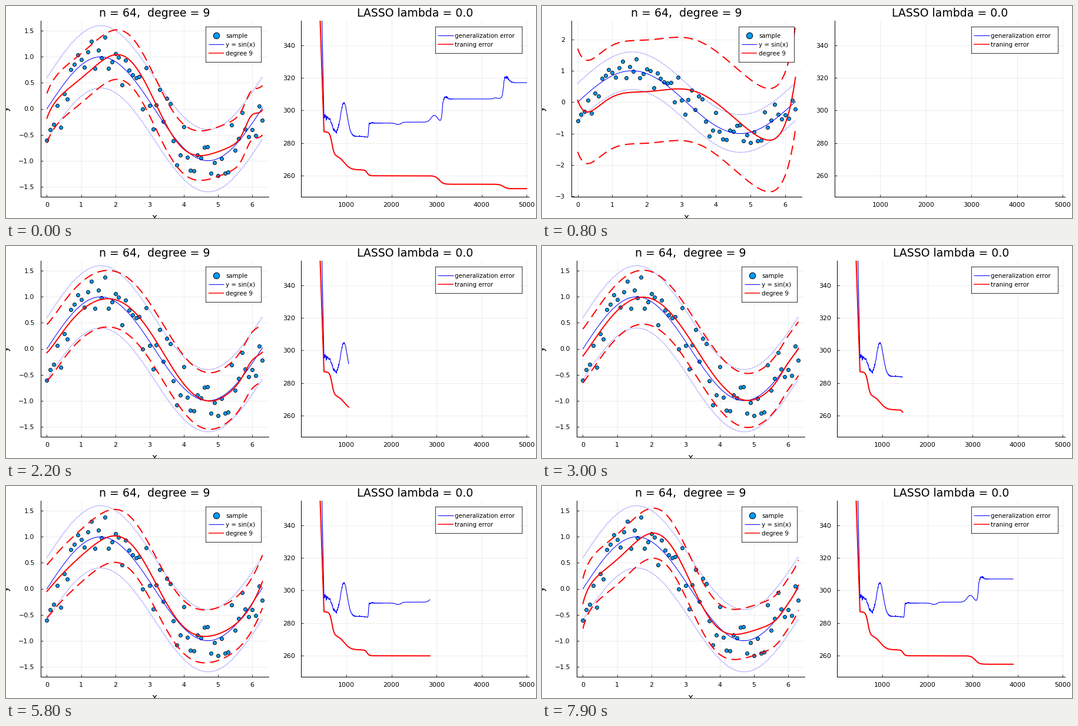
Recreate the animation shown at these times as a matplotlib script. Size 900 by 360 pixels, loop 8 s.

```python
import numpy as np
import matplotlib.pyplot as plt
from matplotlib.animation import FuncAnimation

W, H = 900, 360
FRAMES, INTERVAL = 80, 100
TOP, BOTTOM = 25, 324
END = 6.3
BLUE, RED, DOT = "#0000ff", "#ff0000", "#009afa"
DASH, DOTS = (0, (8, 4.5)), (0, (1, 2))

plt.rcParams["font.family"] = "DejaVu Sans"
rng = np.random.default_rng(8)

# --- noisy samples of a slightly late sine ---------------------------------
xs = np.arange(64) * 0.1
ys = np.sin(xs - 0.15) + np.clip(rng.normal(0, 0.26, xs.size), -0.6, 0.6)

# --- error histories -------------------------------------------------------
steps = np.arange(0, 5001, 5)


def slide(center, width, height):
    """Smooth step from 0 to height."""
    return height * (1 + np.tanh((steps - center) / (2 * width))) / 2


def bump(x, center, width, height=1):
    return height * np.exp(-((x - center) / width) ** 2 / 2)


def plunge(rate):
    return rate * np.maximum(0, 503 - steps)


def jitter(start, decay, size):
    age = np.maximum(0, steps - start)
    return np.where(steps >= start, size * np.exp(-age / decay), 0)


train = 286.9 + plunge(0.8) + sum(slide(*s) for s in [
    (680, 25, -14.3), (950, 70, -9.1), (1460, 22, -3.6),
    (3060, 45, -5.2), (4480, 40, -2.7)])

gen = 296.5 + plunge(1.27)
gen += sum(slide(*s) for s in [
    (690, 40, -12.3), (1400, 50, -0.8), (1492, 5, 8.8), (2220, 15, 0.6),
    (3128, 12, 14.2), (4482, 10, 10)])
gen += sum(bump(steps, *b) for b in [
    (945, 75, 20.5), (2150, 60, -0.8), (2950, 70, 4.2), (3195, 40, 1.3),
    (4310, 45, 0.7), (4540, 60, 3.6)])
gen += rng.normal(size=steps.size) * sum(jitter(*j) for j in [
    (500, 450, 0.8), (1490, 50, 0.7), (3130, 90, 0.7), (4480, 110, 0.8)])

# --- fitted curve ----------------------------------------------------------
grid = np.linspace(0, END, 253)

# the first rough fit, before the error plunges
rough_x = [0, 1, 2, 3, 4, 5, 5.5, 6, END]
rough_y = [.06, .165, .335, .42, -.02, -.93, -1.21, -.70, .79]
rough = np.polyval(np.polyfit(rough_x, rough_y, 8), grid)


def wavy(amp, crest, left, hook, right):
    """Late sine plus a ripple and deviations near both ends."""
    base = np.sin(grid - 0.17 + 0.17 * (grid / END) ** 6)
    ripple = amp * np.cos(2 * np.pi * (grid - crest) / 2.62)
    return (base + ripple + left * np.exp(-grid / 0.15)
            + bump(grid, 5.97, 0.18, hook)
            + right * np.exp((grid - END) / 0.35))


# step, half width of the band, curve
keys = [
    (350, 1.645, rough),
    (750, 0.605, wavy(0.11, 2.95, 0.17, 0.28, -0.28)),
    (1450, 0.520, wavy(0.01, 2.70, 0.02, 0.06, -0.02)),
    (2250, 0.510, wavy(0.11, 2.45, 0.02, 0.00, 0.23)),
    (3200, 0.483, wavy(0.18, 2.40, -0.28, 0.05, 0.23)),
    (5000, 0.477, wavy(0.16, 2.45, -0.16, 0.28, 0.06)),
]
key_err = np.interp([k[0] for k in keys], steps, train)
key_rows = np.array([np.append(curve, hw) for _, hw, curve in keys])


def fit_at(t):
    """Curve and band half width; the fit advances as the error falls."""
    err = np.interp(t, steps, train)
    pos = np.interp(-err, -key_err, np.arange(len(keys)))
    i = min(int(pos), len(keys) - 2)
    row = key_rows[i] + (pos - i) * (key_rows[i + 1] - key_rows[i])
    curve, hw = row[:-1], row[-1]
    if t < 350:
        curve, hw = curve * (t / 350) ** 0.7, 2 - 0.355 * t / 350
    return curve, hw


# --- stage -----------------------------------------------------------------
fig = plt.figure(figsize=(W / 72, H / 72), dpi=72, facecolor="white")


def place(ax, x0, x1, y0=TOP, y1=BOTTOM):
    ax.set_position([x0 / W, 1 - y1 / H, (x1 - x0) / W, (y1 - y0) / H])


def plot_axes(title):
    ax = fig.add_axes([0, 0, 1, 1])
    ax.spines[["top", "right"]].set_visible(False)
    ax.spines[["left", "bottom"]].set_linewidth(1)
    ax.set_axisbelow(True)
    ax.grid(color="black", alpha=0.1, lw=0.7)
    ax.tick_params(direction="in", length=4, width=0.8, labelsize=11)
    ax.tick_params(axis="x", pad=9)
    ax.tick_params(axis="y", pad=10.5)
    ax.text(0.5, 1 + 7.5 / (BOTTOM - TOP), title, transform=ax.transAxes,
            fontsize=18.9, ha="center", va="baseline")
    return ax


def legend_axes(w, h, rows):
    ax = fig.add_axes([0, 0, 1, 1], zorder=5)
    ax.set(xlim=(0, w), ylim=(h, 0), xticks=[], yticks=[])
    for i, (label, color, lw) in enumerate(rows):
        y = 15 + 15 * i
        if lw:
            ax.plot([4.5, 31], [y, y], color=color, lw=lw,
                    solid_capstyle="butt")
        else:
            ax.plot([17.5], [y], "o", ms=10.4, mfc=color, mec="black", mew=1)
        ax.text(34, y + 4, label, fontsize=10.3, va="baseline")
    return ax


left = plot_axes("n = 64,  degree = 9")
right = plot_axes("LASSO lambda = 0.0")
leg_l = legend_axes(94, 60, [("sample", DOT, 0), ("y = sin(x)", BLUE, 1),
                             ("degree 9", RED, 1.5)])
leg_r = legend_axes(147, 45, [("generalization error", BLUE, 1),
                              ("traning error", RED, 1.5)])

left.text(0.5, -40 / (BOTTOM - TOP), "x", transform=left.transAxes,
          fontsize=15.3, ha="center", va="baseline")
fig.text(4.5 / W, 1 - 174.5 / H, "y", fontsize=15.3, rotation=90,
         rotation_mode="anchor", ha="center", va="baseline")

left.set(xlim=(-0.189, 6.489), xticks=range(7))
left.plot(xs, ys, "o", ms=6, mfc=DOT, mec="black", mew=0.9, zorder=2)
for shift, style in ((0, "-"), (0.6, DOTS), (-0.6, DOTS)):
    left.plot(grid, np.sin(grid) + shift, color=BLUE, lw=1, ls=style, zorder=3)
mid, upper, lower = [left.plot([], [], color=RED, lw=2, ls=s, zorder=4)[0]
                     for s in ("-", DASH, DASH)]

right.set(xlim=(0, 5050), ylim=(247, 355), xticks=range(1000, 5001, 1000),
          yticks=range(260, 341, 20))
gen_line, = right.plot([], [], color=BLUE, lw=1.1, zorder=3)
train_line, = right.plot([], [], color=RED, lw=2, zorder=4)


def set_y_axis(lo, hi):
    """Fit the y range with a margin; tell whether labels have decimals."""
    pad = 0.03 * (hi - lo)
    lo, hi = lo - pad, hi + pad
    step = 0.5 if hi - lo < 4 else 1
    ticks = np.arange(np.ceil(lo / step), np.floor(hi / step) + 1) * step
    form = "{:.1f}" if step < 1 else "{:.0f}"
    left.set_ylim(lo, hi)
    left.set_yticks(ticks, [form.format(v + 0.0).replace("-", "\u2212")
                            for v in ticks])
    return step < 1


def layout(decimals):
    x0, x1, r0 = (58.5, 446.4, 501.5) if decimals else (49.5, 441.5, 497)
    place(left, x0, x1)
    place(right, r0, 888)
    place(leg_l, x1 - 107.4, x1 - 13.4, 35, 95)
    place(leg_r, 728.5, 875.5, 35, 80)


def draw(k):
    t = 50 * ((k - 1) % 101)
    t = 5000 if k == 0 else t
    curve, hw = fit_at(t)
    for line, shift in ((mid, 0), (upper, hw), (lower, -hw)):
        line.set_data(grid, curve + shift)
    layout(set_y_axis(min(-1.6, (curve - hw).min()),
                      max(1.6, (curve + hw).max())))
    n = t // 5 + 1
    gen_line.set_data(steps[:n], gen[:n])
    train_line.set_data(steps[:n], train[:n])
    return ()


anim = FuncAnimation(fig, draw, frames=FRAMES, init_func=lambda: draw(0),
                     interval=INTERVAL, repeat=True, repeat_delay=0)
plt.show()
```
